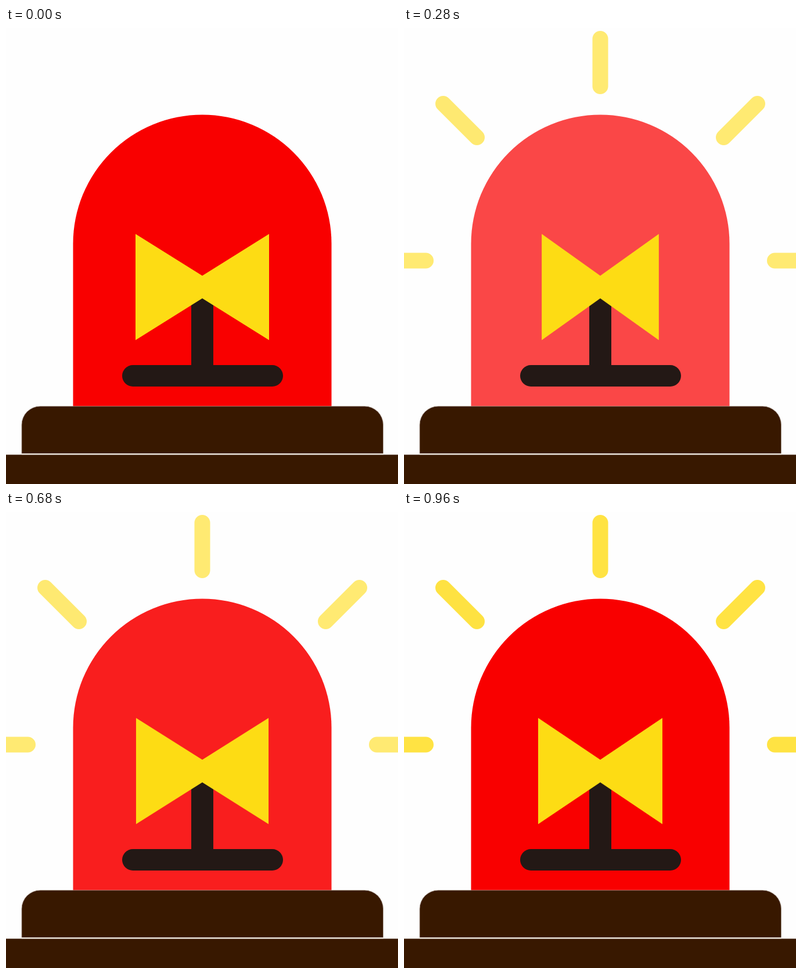
An HTML page for the animation above (1 s loop, 675 by 786 pixels).

```html
<!DOCTYPE html>
<html lang="en">
<head>
<meta charset="utf-8">
<title>Warning light</title>
<style>
  html, body {
    margin: 0;
    width: 100%;
    height: 100%;
    overflow: hidden;
    background: #fefefe;
  }
  svg {
    position: absolute;
    left: 0;
    top: 0;
    display: block;
  }
  /* one shared clock at 25 pictures a second */
  .dome, .rays, .bow {
    animation: 1s -2ms infinite;
  }
  .dome {
    fill: #f90000;
    animation-name: fade;
    animation-timing-function: steps(10, end);
  }
  .rays {
    fill: none;
    stroke: #ffdc14;
    stroke-width: 27;
    stroke-linecap: round;
    animation-name: blink;
    animation-timing-function: steps(5, end);
  }
  .bow {
    position: absolute;
    left: 223px;
    top: 355px;
    width: 230px;
    height: 183px;
    background: #fddc14;
    clip-path: polygon(0 0, 115px 72px, 100% 0, 100% 100%, 115px 111px, 0 100%);
    animation-name: spin;
    animation-timing-function: steps(25, end);
  }
  .lamp { fill: #231815; }
  .wood { fill: #381800; }

  @keyframes fade {
    0%, 80%, 100% { opacity: 1; }
    40% { opacity: .6; }
  }
  @keyframes blink {
    0%, 40%, 80% { opacity: 0; }
    20%, 60%, 100% { opacity: 1; }
  }
  @keyframes spin {
    from { transform: rotateY(0deg); }
    to { transform: rotateY(540deg); }
  }
</style>
</head>
<body>
<svg width="675" height="786" viewBox="0 0 675 786">
  <path class="rays" d="M338 18.5V100.5 M67.5 130.5L125.5 188.5 M608.5 130.5L550.5 188.5 M-40 401H37.5 M716 401H638.5"/>
  <path class="dome" d="M115.5 652V372A222.5 222.5 0 0 1 560.5 372V652Z"/>
  <g class="lamp">
    <rect x="319" y="447" width="38" height="150"/>
    <rect x="200" y="581" width="277" height="37" rx="18.5"/>
  </g>
  <g class="wood">
    <path d="M27 734V684A32 32 0 0 1 59 652H617.5A32 32 0 0 1 649.5 684V734Z" stroke="#a89a90" stroke-width=".8"/>
    <rect y="735.5" width="675" height="51"/>
  </g>
  <path d="M27 734.3H650" stroke="#e6ded6" stroke-width="2.2"/>
</svg>
<div class="bow"></div>
</body>
</html>
```
